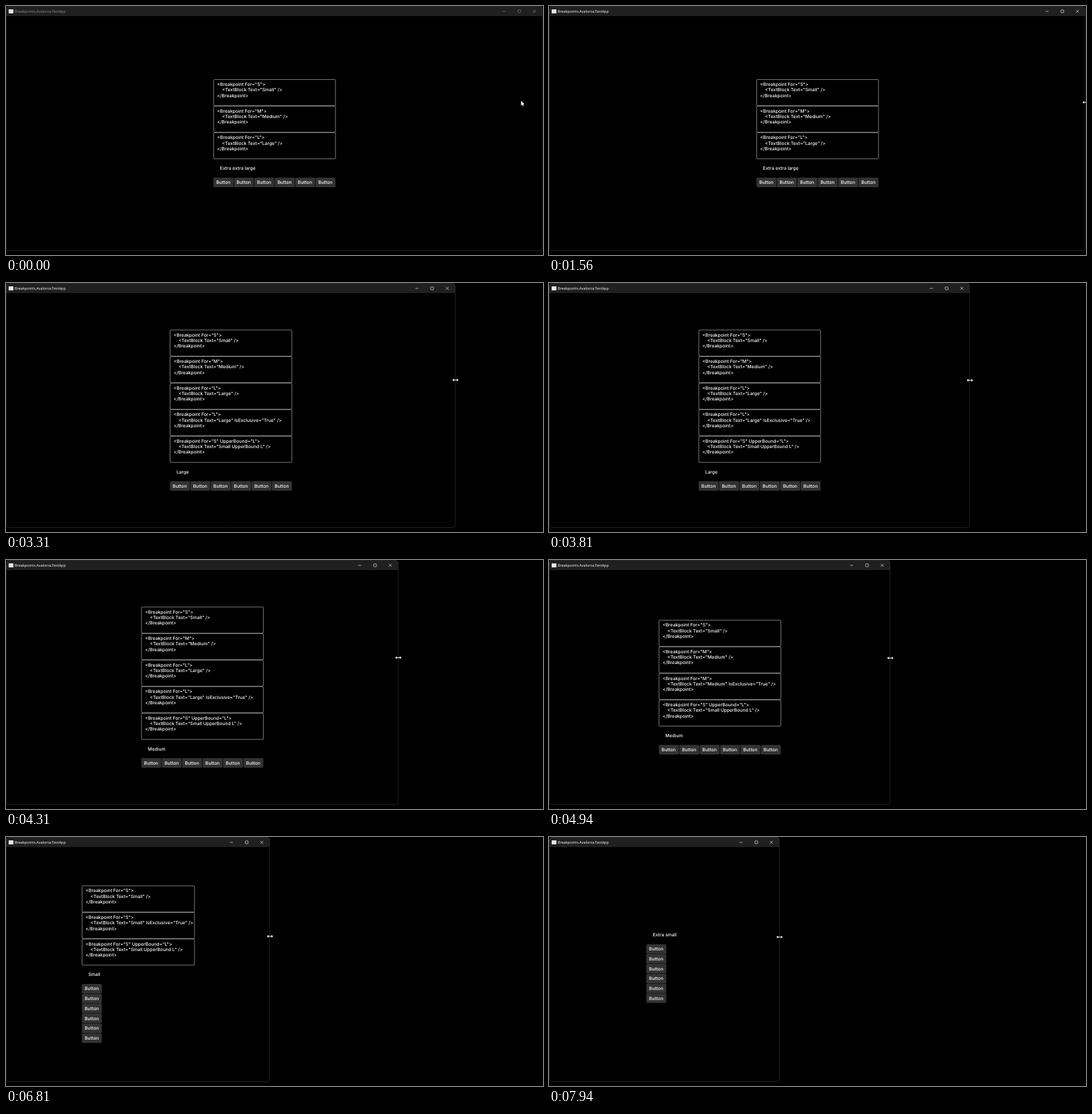
These frames come from a looping animation (800 by 371 pixels, 8000 ms). An HTML page with a canvas:

```html
<!DOCTYPE html>
<html lang="en">
<head>
<meta charset="utf-8">
<title>Breakpoints</title>
<style>
  html, body { margin: 0; width: 100%; height: 100%; overflow: hidden; background: #000; }
  canvas { display: block; width: 800px; height: 371px; }
</style>
</head>
<body>
<canvas id="stage"></canvas>
<script>
const LOOP = 8000, DRAG = 1880, STEP = 62.35;
const UI = '500 6.77px Inter, "Open Sans", sans-serif';
const TITLE = '5.53px "Open Sans", "Noto Sans", sans-serif';
const LINE = 8.25, BOX_H = 39.55, LABEL_H = 27.75, BTN_W = 29.7, BTN_H = 14.2;

// key points of the drag: [time, window width]
const drag = [[DRAG, 799], [2440, 751], [2630, 742], [3310, 669.5], [4310, 584.3],
  [4940, 507.5], [6000, 446.6], [6690, 398], [7930, 343]];

const tag = (open, text, extra = '') =>
  [`<Breakpoint For="${open}>`, `    <TextBlock Text="${text}"${extra} />`, '</Breakpoint>'];
const plain = name => tag(`${name[0]}"`, name);
const only = name => tag(`${name[0]}"`, name, ' IsExclusive="True"');
const [small, medium, large] = ['Small', 'Medium', 'Large'].map(plain);
const upper = tag('S" UpperBound="L"', 'Small UpperBound L');

const levels = [
  { min: 779, label: 'Extra extra large', w: 182, boxes: [small, medium, large] },
  { min: 586, label: 'Large', w: 182, boxes: [small, medium, large, only('Large'), upper] },
  { min: 487, label: 'Medium', w: 182, boxes: [small, medium, only('Medium'), upper] },
  { min: 389.5, label: 'Small', w: 168, column: true, boxes: [small, only('Small'), upper] },
  { min: 0, label: 'Extra small', w: 54.4, column: true, boxes: [] }
];

const canvas = document.getElementById('stage');
const ctx = canvas.getContext('2d');
const dpr = window.devicePixelRatio || 1;
canvas.width = Math.round(800 * dpr);
canvas.height = Math.round(371 * dpr);

const clamp = v => Math.min(1, Math.max(0, v));

function widthAt(t) {
  const i = drag.findIndex(([time]) => t < time);
  if (i === 0) return drag[0][1];
  if (i < 0) return drag[drag.length - 1][1];
  const [t0, w0] = drag[i - 1], [t1, w1] = drag[i];
  return w0 + (w1 - w0) * (t - t0) / (t1 - t0);
}

const levelAt = t => levels.find(l => widthAt(t) >= l.min);

function text(str, x, y, font = UI, color = '#fff') {
  ctx.save();
  // an invisible slant keeps baselines off the pixel grid
  ctx.translate(x, y);
  ctx.transform(1, 0.0003, 0, 1, 0, 0);
  ctx.font = font;
  ctx.fillStyle = color;
  ctx.fillText(str, 0, 0);
  ctx.restore();
}

function round(x, y, w, h, r) {
  ctx.beginPath();
  ctx.roundRect(x, y, w, h, r);
}

function poly(points) {
  ctx.beginPath();
  points.forEach(([x, y]) => ctx.lineTo(x, y));
  ctx.closePath();
  ctx.fill();
}

function drawWindow(w, active) {
  const ink = active ? '#fff' : '#8c8c8c';
  round(0.5, 0.5, w - 0.5, 364, 4);
  ctx.save();
  ctx.clip();
  ctx.fillStyle = '#202020';
  ctx.fillRect(0, 0, w, 15);
  ctx.restore();
  ctx.strokeStyle = '#3a3a3a';
  ctx.lineWidth = 0.6;
  ctx.stroke();

  ctx.fillStyle = '#e6e6e6';
  ctx.fillRect(4, 5, 7, 6);
  text('Breakpoints.Avalonia.TestApp', 13, 10, TITLE, ink);

  ctx.strokeStyle = ink;
  ctx.lineWidth = 0.6;
  ctx.beginPath();
  ctx.moveTo(w - 59.3, 8);
  ctx.lineTo(w - 54.8, 8);
  ctx.roundRect(w - 36.4, 5.8, 4.2, 4.2, 0.8);
  ctx.moveTo(w - 13.8, 5.8);
  ctx.lineTo(w - 9.6, 10);
  ctx.moveTo(w - 9.6, 5.8);
  ctx.lineTo(w - 13.8, 10);
  ctx.stroke();
}

function drawContent(w, level, label) {
  const { boxes, column } = level;
  const rows = column ? 5 * 14.7 + BTN_H : BTN_H;
  const x = w / 2 + 0.6 - level.w / 2;
  let y = 189.6 - (boxes.length * BOX_H + LABEL_H + rows) / 2;

  for (const lines of boxes) {
    round(x + 0.25, y + 0.25, level.w - 0.5, BOX_H - 0.5, 1.3);
    ctx.strokeStyle = '#fff';
    ctx.lineWidth = 0.48;
    ctx.stroke();
    lines.forEach((s, i) => text(s, x + 5.5, y + 9.9 + i * LINE));
    y += BOX_H;
  }

  text(label, x + 9.7, y + 16.2);
  y += LABEL_H;

  for (let i = 0; i < 6; i++) {
    const bx = x + (column ? 0 : i * 30.4), by = y + (column ? i * 14.7 : 0);
    round(bx, by, BTN_W, BTN_H, 1.4);
    ctx.fillStyle = '#333';
    ctx.fill();
    text('Button', bx + 4.1, by + 9.5);
  }
}

function drawArrow(x, y) {
  ctx.fillStyle = '#fff';
  poly([[0, 0], [0, 7], [1.6, 5.6], [2.7, 8], [3.9, 7.5], [2.9, 5.2], [5, 5.1]]
    .map(([a, b]) => [x + a, y + b]));
}

function drawResize(x, y) {
  ctx.fillStyle = '#fff';
  ctx.fillRect(x - 3, y - 0.5, 6, 1);
  for (const s of [-1, 1]) {
    poly([[x + s * 4.6, y], [x + s * 2.2, y - 2.2], [x + s * 2.2, y + 2.2]]);
  }
}

function drawPointer(t, w) {
  if (t < 990) {
    const p = clamp((t - 60) / 750);
    drawArrow(767.3 + 28.5 * p, 141.2 + 2 * p);
  } else {
    drawResize(w + 0.4, 143.6 + Math.max(t - 2440, 0) / 1000);
  }
}

function draw(time) {
  // the picture advances in steps of about 62 ms
  const t = Math.max(0, DRAG + STEP * Math.floor((time - DRAG) / STEP + 0.1));
  const w = widthAt(t);

  ctx.setTransform(dpr, 0, 0, dpr, 0, 0);
  ctx.textRendering = 'geometricPrecision';
  ctx.fillStyle = '#000';
  ctx.fillRect(0, 0, 800, 371);

  drawWindow(w, time >= 1560);
  // the list follows the label one step later
  drawContent(w, levelAt(t - STEP), levelAt(t).label);
  drawPointer(t, w);
}

const start = performance.now();
function tick() {
  draw((performance.now() - start) % LOOP);
  requestAnimationFrame(tick);
}
tick();
</script>
</body>
</html>
```
